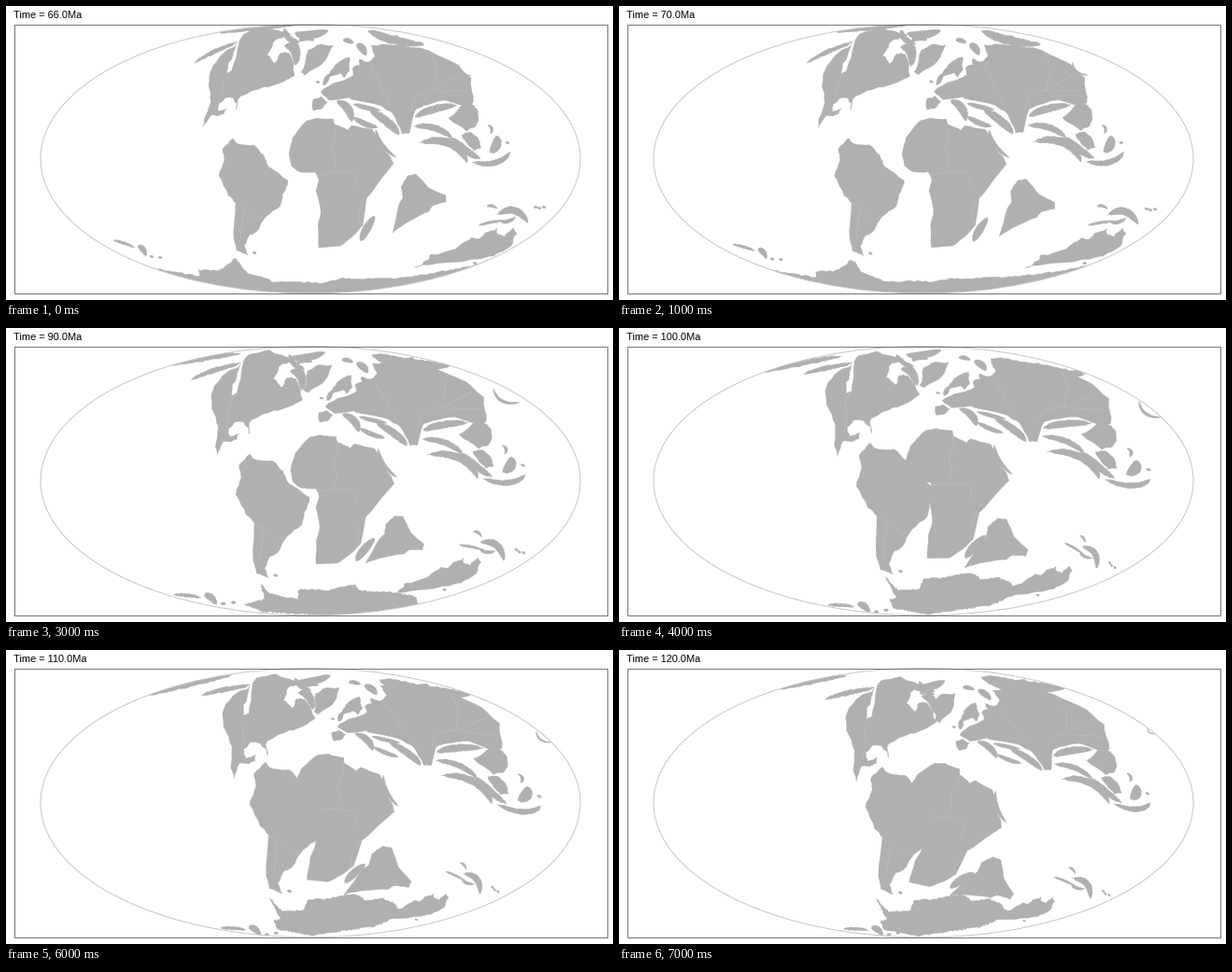
Write a matplotlib script that moves like this. It is 650 px wide and 315 px high and loops after 8000 ms.

```python
import numpy as np
import matplotlib.pyplot as plt
from matplotlib.animation import FuncAnimation
from matplotlib.patches import Ellipse, Rectangle

W, H, DPI = 650, 315, 100
PX = 72 / DPI
LAND, SEAM, EDGE = "#b0b0b0", "#bebebe", "#c8c8c8"
AGES = [66, 70, 80, 90, 100, 105, 110, 120]
KEY_AGES = [66, 80, 90, 100, 110, 120]

fig = plt.figure(figsize=(W / DPI, H / DPI), dpi=DPI, facecolor="white")
ax = fig.add_axes([0, 0, 1, 1])
ax.set_xlim(0, W)
ax.set_ylim(H, 0)
ax.axis("off")

globe = Ellipse((326, 163.7), 578, 288.4, fc="none", ec=EDGE, lw=PX, zorder=3)
ax.add_patch(globe)
ax.add_patch(Rectangle((8.5, 19.5), 635, 288, fc="none", ec="#555555",
                       lw=0.8 * PX, zorder=4))
title = ax.text(8, 13, "", family="Liberation Sans", size=11 * PX, color="black")

rng = np.random.default_rng(7)
parts = []


def points(flat):
    xy = np.array(flat, float).reshape(-1, 2)
    return xy[:, 0] + 1j * xy[:, 1]


def strip(width, *spine):
    """Tapered band along a smooth curve through the spine points."""
    z = points(spine)
    k, t = np.linspace(0, 1, len(z)), np.linspace(0, 1, 13)
    curve = (np.polyval(np.polyfit(k, z.real, len(z) - 1), t)
             + 1j * np.polyval(np.polyfit(k, z.imag, len(z) - 1), t))
    along = np.gradient(curve)
    half = width / 2 * np.sqrt(np.maximum(np.sin(np.pi * t), 0))
    off = 1j * along / abs(along) * half
    return np.concatenate([curve + off, (curve - off)[::-1]])


def speck(x, y):
    return strip(2.5, x, y, x + 4, y + 1)


def rugged(z, amount):
    """Split every side twice and nudge the new points sideways."""
    for _ in range(2):
        side = np.roll(z, -1) - z
        push = rng.uniform(-amount, amount, len(z))
        push *= np.minimum(1, 9 / np.maximum(abs(side), 1e-6))
        z = np.column_stack([z, z + side * (0.5 + 1j * push)]).ravel()
    return z


def basis(z, n):
    z = (z - 326 - 164j) / 150
    return np.column_stack([z ** 0, z, z.conj(), z ** 2])[:, :n]


def at_age(tracks, age):
    return np.array([np.interp(age, KEY_AGES, r.real)
                     + 1j * np.interp(age, KEY_AGES, r.imag) for r in tracks])


def add(kind, shape):
    if kind == "land":
        art, = ax.fill([0, 1, 1], [0, 0, 1], fc=LAND, ec=LAND, lw=0.3 * PX)
    else:
        art, = ax.plot([], [], color=SEAM, lw=0.6 * PX, zorder=2)
    art.set_clip_path(globe)
    parts.append((art, shape))


def plate(marks, *outlines, ref=0, rough=0.12, seams=()):
    """Shapes drawn at key age `ref`, carried along by landmark tracks."""
    marks = [points(m) for m in marks]
    n = len(marks)
    fit = np.linalg.inv(basis(np.array([m[ref] for m in marks]), n))
    for kind, group in (("land", outlines), ("seam", seams)):
        for item in group:
            z = item if isinstance(item, np.ndarray) else points(item)
            if kind == "land":
                z = rugged(z, rough)
            weights = basis(z, n) @ fit
            add(kind, lambda age, w=weights: w @ at_age(marks, age))


# Africa with Arabia
plate([[304, 155, 305, 154, 306, 148, 308, 140, 311, 140, 313, 145],
       [340, 260, 338, 259, 337, 254, 335, 248, 327, 248, 315, 251]],
      [322, 123, 333, 120, 350, 121, 352, 127, 366, 133, 370, 128, 392, 132,
       402, 151, 412, 162, 415, 169, 406, 180, 386, 206, 382, 235, 371, 247,
       358, 257, 335, 259, 334, 235, 337, 218, 332, 198, 335, 186, 331, 178,
       315, 178, 306, 172, 303, 160, 307, 141],
      strip(4, 396, 132, 403, 149, 418, 162),
      rough=0.06,
      seams=[[350, 121, 353, 138, 349, 152, 354, 164, 350, 178, 334, 181],
             [350, 178, 372, 177, 376, 184, 374, 194],
             [383, 207, 378, 222, 380, 237]])

# South America
plate([[228, 180, 238, 180, 246, 176, 254, 167, 261, 163, 264, 166],
       [254, 266, 265, 268, 276, 267, 288, 263, 290, 260, 288, 261]],
      [232, 153, 243, 142, 247, 147, 265, 149, 276, 160, 281, 172, 302, 187,
       296, 202, 293, 215, 279, 225, 268, 242, 261, 245, 255, 257, 259, 267,
       247, 262, 244, 250, 246, 211, 238, 203, 228, 182, 234, 165],
      speck(264, 264), rough=0.1,
      seams=[[246, 212, 262, 221, 268, 230, 276, 226],
             [254, 218, 253, 232, 251, 250]])

# India, then Madagascar
plate([[439, 180, 429, 199, 425, 202, 415, 205, 413, 212, 409, 225],
       [414, 243, 390, 257, 385, 252, 370, 257, 362, 262, 354, 263]],
      [439, 180, 453, 195, 471, 203, 471, 210, 457, 214, 453, 220, 433, 230,
       414, 243, 421, 212, 425, 205, 423, 194, 430, 182],
      rough=0.06)
plate([[394, 225, 394, 231, 394, 225, 392, 222, 384, 229, 379, 238],
       [381, 251, 379, 253, 376, 249, 372, 246, 364, 249, 356, 255]],
      strip(8.5, 395, 225, 386, 239, 380, 252), rough=0.06)

# Australia, New Guinea and its islands
plate([[437, 280, 428, 282, 412, 286, 395, 290, 390, 291, 388, 291],
       [543, 239, 529, 240, 505, 247, 482, 256, 471, 262, 464, 266]],
      [437, 280, 452, 272, 455, 266, 482, 260, 499, 248, 508, 249, 513, 243,
       526, 238, 526, 244, 534, 247, 543, 238, 547, 244, 541, 257, 522, 268,
       508, 271, 470, 275],
      speck(500, 275), rough=0.18)
plate([[530, 220, 520, 222, 512, 228, 500, 234, 494, 239, 490, 244],
       [578, 216, 571, 224, 556, 242, 532, 258, 528, 260, 526, 264]],
      strip(8, 526, 224, 544, 219, 559, 232),
      strip(4, 529, 229, 536, 231, 546, 226),
      strip(3, 506, 235, 518, 232, 531, 230),
      strip(3, 515, 215, 520, 214, 526, 217),
      speck(565, 215), speck(569, 216), speck(574, 215), rough=0.2)

# New Zealand, sliding along the lower left limb
plate([[115, 252, 140, 268, 180, 287, 224, 298, 230, 299, 241, 300],
       [150, 266, 178, 276, 225, 294, 268, 303, 272, 304, 282, 304]],
      strip(3, 115, 251, 126, 254, 138, 259),
      strip(6, 141, 258, 146, 260, 150, 268),
      speck(154, 268), speck(163, 269), rough=0.2)

# North America with its western margin
plate([[211, 129, 218, 132, 226, 136, 234, 137, 244, 137, 254, 140],
       [306, 80, 313, 82, 315, 82, 321, 76, 330, 78, 338, 82],
       [250, 38, 259, 38, 254, 37, 252, 37, 264, 37, 276, 40],
       [219, 73, 221, 75, 221, 72, 222, 68, 233, 68, 244, 72]],
      [243, 70, 249, 68, 252, 38, 256, 30, 276, 25, 305, 33, 289, 41, 286, 53,
       296, 61, 300, 51, 309, 51, 322, 71, 309, 80, 294, 85, 270, 97, 271, 113,
       266, 104, 259, 99, 251, 99, 244, 106, 247, 116, 258, 112, 257, 119,
       250, 122, 238, 116],
      [231, 122, 229, 98, 222, 76, 222, 64, 236, 46, 249, 39, 247, 50, 243, 58,
       245, 85, 243, 112, 249, 121, 240, 121, 234, 138],
      strip(9, 302, 45, 313, 47, 319, 62),
      strip(5, 198, 49, 222, 43, 250, 38),
      strip(5, 297, 28, 304, 37, 316, 41),
      ref=3, rough=0.18,
      seams=[[248, 68, 242, 80, 244, 96, 241, 112]])
plate([[238, 122, 235, 124, 237, 135, 243, 138, 248, 135, 254, 133]],
      strip(3, 237, 121, 246, 124, 251, 140), speck(230, 125))

# Eastern Siberia on both sides of the arctic limb
plate([[232, 28, 245, 26, 180, 39, 159, 46, 157, 47, 176, 41],
       [308, 21, 303, 22, 250, 28, 237, 31, 240, 28, 243, 28]],
      strip(5, 156, 47, 195, 38, 238, 30), ref=3)
plate([[388, 25, 390, 25, 392, 27, 398, 31, 400, 30, 388, 27],
       [447, 41, 459, 41, 475, 40, 497, 49, 497, 47, 477, 40]],
      strip(9, 388, 26, 414, 36, 448, 41), rough=0.16)

# Eurasia, Greenland and the blocks around the Tethys
plate([[337, 92, 339, 90, 342, 84, 346, 78, 355, 82, 365, 91],
       [500, 88, 503, 88, 514, 85, 527, 87, 531, 90, 523, 91],
       [393, 41, 393, 40, 394, 37, 400, 35, 403, 37, 402, 42],
       [491, 167, 494, 164, 502, 160, 511, 160, 517, 163, 522, 163]],
      [337, 92, 357, 81, 372, 74, 371, 67, 379, 63, 378, 57, 388, 60, 395, 54,
       391, 42, 405, 41, 444, 45, 476, 59, 498, 77, 500, 104, 492, 106,
       470, 101, 447, 107, 438, 112, 432, 136, 424, 137, 414, 115, 402, 107,
       374, 101, 367, 98, 346, 101],
      [346, 76, 348, 69, 358, 59, 368, 55, 368, 69, 362, 77, 358, 72],
      strip(5, 340, 85, 343, 79, 346, 73), speck(332, 81),
      strip(8, 375, 42, 381, 45, 385, 53),
      strip(5, 361, 37, 366, 37, 372, 40),
      [316, 71, 324, 47, 333, 42, 350, 42, 342, 58, 320, 74],
      strip(9, 309, 29, 325, 31, 345, 26), strip(6, 314, 38, 321, 34, 330, 37),
      [329, 100, 337, 97, 344, 103, 338, 110, 329, 112],
      strip(9, 354, 102, 366, 110, 370, 124),
      strip(6, 372, 119, 384, 126, 398, 130),
      strip(5, 372, 105, 386, 109, 401, 112),
      strip(9, 389, 112, 408, 124, 421, 138),
      [474, 120, 488, 106, 497, 104, 504, 110, 506, 120, 503, 129, 494, 134,
       487, 129],
      strip(8, 438, 119, 457, 111, 483, 106),
      strip(7, 437, 129, 460, 131, 478, 142),
      strip(9, 442, 147, 475, 147, 494, 168),
      strip(8, 477, 141, 490, 153, 508, 164),
      [488, 138, 497, 135, 505, 141, 509, 152, 501, 155, 494, 148],
      strip(10, 525, 139, 525, 149, 518, 157),
      strip(6, 499, 167, 524, 168, 540, 156),
      strip(3, 516, 128, 520, 131, 519, 137),
      speck(535, 146),
      rough=0.13,
      seams=[[391, 62, 399, 80, 411, 107],
             [433, 113, 438, 97, 462, 88, 487, 72],
             [455, 50, 462, 66, 457, 92, 496, 90]])

# Island arc off Siberia, seen again at the left limb
plate([[485, 62, 488, 55, 522, 65, 557, 78, 568, 87, 566, 84],
       [498, 75, 512, 72, 550, 80, 581, 96, 584, 99, 574, 90]],
      strip(3, 522, 65, 531, 78, 550, 80), ref=2)
plate([[0, 150, 0, 150, 0, 150, 58, 103, 76, 95, 80, 88]],
      strip(2.5, 80, 88, 96, 79, 113, 73),
      strip(2, 79, 90, 88, 88, 99, 85), ref=5)

# Antarctica changes outline as it turns over the pole
ice = [points(p) for p in (
    [158, 281, 208, 290, 205, 283, 230, 283, 246, 270, 258, 286, 279, 291,
     285, 297, 300, 295, 340, 297, 360, 292, 420, 292, 460, 286, 515, 275,
     515, 325, 158, 325],
    [172, 287, 222, 295, 221, 288, 250, 283, 260, 269, 258, 279, 270, 291,
     295, 297, 302, 291, 345, 293, 390, 288, 450, 289, 495, 281, 495, 325,
     172, 325],
    [256, 296, 277, 291, 273, 274, 281, 284, 312, 291, 314, 280, 345, 281,
     373, 275, 380, 282, 412, 283, 440, 288, 440, 298, 360, 309, 275, 304],
    [286, 267, 298, 281, 322, 280, 327, 268, 345, 268, 376, 262, 389, 270,
     405, 267, 418, 272, 428, 284, 398, 297, 330, 307, 293, 300, 290, 291,
     297, 289])]
ice += [ice[-1] - (3 + 1j), ice[-1] - (10 + 0.5j)]


def resample(z, n=240):
    z = np.append(z, z[0])
    run = np.insert(np.cumsum(abs(np.diff(z))), 0, 0)
    return np.interp(np.linspace(0, run[-1], n, endpoint=False), run, z)


coast = rng.uniform(-0.9, 0.9, 240) + 1j * rng.uniform(-0.9, 0.9, 240)
ice_tracks = np.array([resample(z) + coast for z in ice]).T
add("land", lambda age: at_age(ice_tracks, age))


def draw(i):
    age = AGES[i]
    title.set_text(f"Time = {age:.1f}Ma")
    for art, shape in parts:
        z = shape(age)
        if hasattr(art, "set_xy"):
            art.set_xy(np.column_stack([z.real, z.imag]))
        else:
            art.set_data(z.real, z.imag)
    return [title] + [art for art, _ in parts]


anim = FuncAnimation(fig, draw, frames=len(AGES), interval=1000,
                     repeat=True, repeat_delay=0)
plt.show()
```
